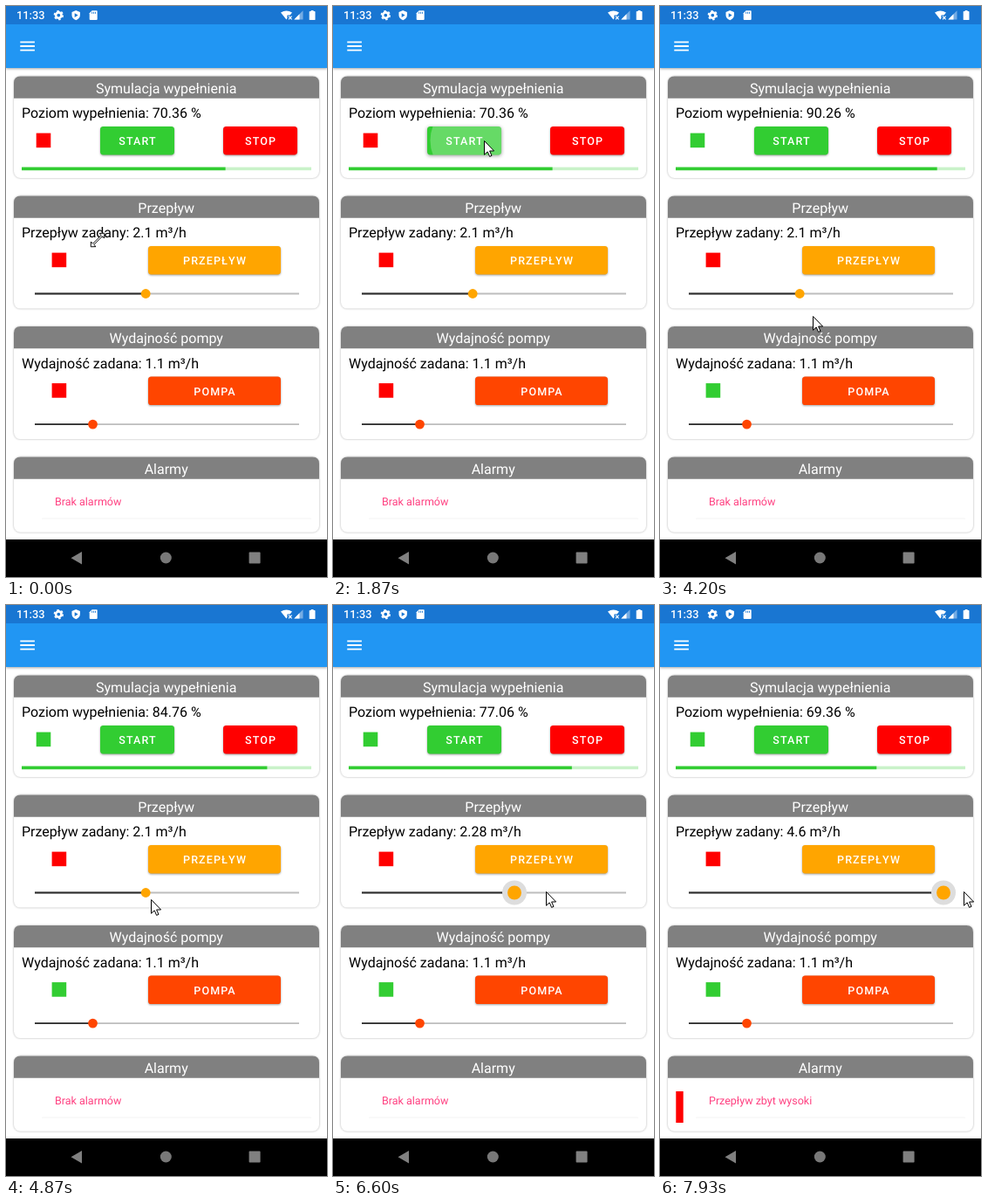
Recreate the animation shown at these times as an HTML page. Size 368 by 654 pixels, loop 8000 ms.

```html
<!DOCTYPE html>
<html lang="pl">
<head>
<meta charset="utf-8">
<title>Symulacja</title>
<style>
  html, body { margin: 0; width: 100%; height: 100%; overflow: hidden; background: #fff; }
  svg { display: block; width: 368px; height: 654px; font: 16px Roboto, sans-serif; text-rendering: geometricPrecision; }
  .card { fill: #fff; filter: drop-shadow(0 .7px .8px rgba(0,0,0,.32)); }
  .title { fill: #fff; text-anchor: middle; }
  .btn { filter: drop-shadow(0 1px 1px rgba(0,0,0,.32)) drop-shadow(0 0 .7px rgba(0,0,0,.15)); }
  .btn.up { filter: drop-shadow(0 1.5px 2.2px rgba(0,0,0,.42)); }
  .label { font-size: 12.5px; font-weight: 500; letter-spacing: 1.12px; fill: #fff; text-anchor: middle; }
  .bar { filter: drop-shadow(0 1px 1.5px rgba(0,0,0,.35)); }
</style>
</head>
<body>
<svg viewBox="0 0 368 654">
  <rect width="368" height="654" fill="#fff"/>
  <rect class="bar" y="21" width="368" height="50" fill="#2196f3"/>
  <rect width="368" height="21" fill="#1976d2"/>
  <g fill="#fff">
    <text x="12" y="15.2" font-size="12.8" font-weight="500">11:33</text>
    <circle cx="60.3" cy="10.6" r="3.2" fill="none" stroke="#fff" stroke-width="2.6"/>
    <circle cx="60.3" cy="10.6" r="4.9" fill="none" stroke="#fff" stroke-width="1.6" stroke-dasharray="2.5 2.63"/>
    <path d="M80.2 5l4.7 2v3.6c0 2.8-2 4.7-4.7 5.6-2.7-.9-4.7-2.8-4.7-5.6V7z"/>
    <path d="M78.7 8.2v4.8l3.9-2.4z" fill="#1976d2"/>
    <path d="M98.6 5.2h5.2q.9 0 .9.9v9q0 .9-.9.9h-7.2q-.9 0-.9-.9V8.2z"/>
    <path d="M98.7 6.8v2M100.6 6.8v2M102.5 6.8v2" stroke="#1976d2" stroke-width=".9"/>
    <path d="M315 7.6Q321.4 3.2 328 7.6l-2.4 2.9h-3.2v3.6l-1 1.4z"/>
    <path d="M324 11.7l3.6 3.6m0-3.6l-3.6 3.6" stroke="#fff" stroke-width="1.2"/>
    <path d="M340.5 5.3v10.2h-10.2z" opacity=".4"/>
    <path d="M336.5 9.3v6.2h-6.2z"/>
    <path d="M349.7 5.9V5h2.8v.9h1.3q.7 0 .7.7v8.8q0 .7-.7.7h-5.4q-.7 0-.7-.7V6.6q0-.7.7-.7z"/>
    <path d="M16.3 41.4h16.6M16.3 46h16.6M16.3 50.6h16.6" stroke="#fff" stroke-width="1.8"/>
  </g>
  <g id="ui"></g>
  <g id="cursor" stroke="#000">
    <path id="arrow" fill="#fff" d="M.5 .5V16.3L4.2 12.9 6.6 18.4 9 17.4 6.6 12H11.6Z"/>
    <path id="resize" fill="#fff" stroke-width=".9" transform="rotate(-45)"
      d="M-11 0L-6.8-4V-.9H6.8V-4L11 0 6.8 4V.9H-6.8V4Z"/>
  </g>
  <rect y="611" width="368" height="43"/>
  <g fill="#808080">
    <path d="M74.5 632.3L87 625v14.6z"/>
    <circle cx="183.3" cy="632" r="6.5" fill="#787878"/>
    <rect x="278.6" y="625.6" width="13" height="13" rx=".8"/>
  </g>
</svg>
<script>
const RED = '#ff0000', GREEN = '#32cd32';
const $ = id => document.getElementById(id);
const set = (id, attrs) => {
  for (const k in attrs) $(id).setAttribute(k, attrs[k]);
};
const show = (id, on) => set(id, { visibility: on ? 'visible' : 'hidden' });

const card = (y, h, title) => `
  <rect class="card" x="9" y="${y}" width="350" height="${h}" rx="7.5"/>
  <path fill="#808080" d="M9 ${y + 25.3}v-17.8q0-7.5 7.5-7.5h335q7.5 0 7.5 7.5v17.8z"/>
  <text class="title" x="183.7" y="${y + 19.4}">${title}</text>`;
const line = (id, y) => `<text id="${id}" x="18" y="${y}"></text>`;
const led = (id, x, y) => `<rect id="${id}" x="${x}" y="${y}" width="16.6" height="16.6"/>`;
const button = (id, x, y, w, color, label) => `
  <rect id="${id}" class="btn" x="${x}" y="${y}" width="${w}" height="32.4" rx="3.6" fill="${color}"/>
  <g id="${id}Ink"></g>
  <text class="label" x="${x + w / 2 + .56}" y="${y + 20.9}">${label}</text>`;
const slider = (id, y, x, color) => `
  <path d="M33 ${y}H336" stroke="#bdbdbd" stroke-width="1.8"/>
  <path id="${id}Track" d="M33 ${y}H${x}" stroke="#2c2c2c" stroke-width="1.8"/>
  <circle id="${id}Halo" cx="${x}" cy="${y}" r="0" fill="#ddd"/>
  <circle id="${id}Thumb" cx="${x}" cy="${y}" r="5.4" fill="${color}"/>`;

$('ui').innerHTML =
  card(80.4, 116.6, 'Symulacja wypełnienia') + line('level', 128.2) + led('simLed', 34.7, 145.6) +
  button('start', 108, 138, 85, GREEN, 'START') + button('stop', 249, 138, 85, RED, 'STOP') +
  `<rect x="18" y="184.6" width="332" height="3.6" fill="#c9f2c9"/>
   <rect id="fill" x="18" y="184.6" height="3.6" fill="${GREEN}"/>` +
  card(217.4, 129.2, 'Przepływ') + line('flow', 265.2) + led('flowLed', 52.6, 282.6) +
  button('flowBtn', 163, 275, 152, '#ffa500', 'PRZEPŁYW') + slider('flow', 329.5, 160.2, '#ffa500') +
  card(366.9, 129.2, 'Wydajność pompy') + line('pump', 414.8) + led('pumpLed', 52.6, 432.1) +
  button('pumpBtn', 163, 424.6, 152, '#ff4500', 'POMPA') + slider('pump', 479.1, 99.5, '#ff4500') +
  card(516.5, 86.2, 'Alarmy') +
  `<path d="M41 587H350" stroke="#f4f4f4"/>
   <rect id="alarmMark" x="18.3" y="557" width="8.4" height="36" fill="${RED}"/>
   <text id="alarm" x="56" y="571.5" font-size="12.5" fill="#ff4081"></text>`;
$('pump').textContent = 'Wydajność zadana: 1.1 m³/h';
$('startInk').innerHTML = `<clipPath id="clip"><rect x="108" y="138" width="85" height="32.4" rx="3.6"/></clipPath>
  <circle cx="157" cy="154" r="45.5" fill="#fff" opacity=".25" clip-path="url(#clip)"/>`;

// All times are ticks of 1/15 s.
const LOOP = 8000, TICK = 1000 / 15;
const PRESS = 28, DRAG = 92, ALERT = 119;
const pointer = [
  [7, 106, 267], [13, 173, 154], [40, 173, 154], [45, 192, 287], [50, 200, 435], [63, 175, 355],
  [77, 163, 330], [85, 167, 328], [90, 168, 328], [99, 244, 328], [119, 348, 328]
];
const thumb = [[91, 160.2], [92, 171.2], [99, 208], [116, 311.8], [119, 325]];
// Simulation steps done so far.
const progress = [[33, 0], [34, 1], [38, 3], [45, 4], [50, 7], [61, 10], [64, 11], [77, 17], [85, 19], [99, 22], [119, 29]];

function along(keys, n) {
  const i = keys.findIndex(k => k[0] > n);
  if (i === 0) return keys[0].slice(1);
  if (i < 0) return keys[keys.length - 1].slice(1);
  const a = keys[i - 1], b = keys[i], f = (n - a[0]) / (b[0] - a[0]);
  return a.slice(1).map((v, j) => v + (b[j + 1] - v) * f);
}

// Inflow adds 2.1 for ten steps, the pump takes 1.1 from the tenth on.
const levelAt = steps => 70.36 + 2.1 * Math.min(steps, 10) - 1.1 * Math.max(steps - 9, 0);

// The reading is sampled from the slider every eight ticks.
function flowAt(n) {
  if (n < DRAG) return 2.1;
  const [x] = along(thumb, n - (n - DRAG) % 8);
  return +((x - 33) / 303 * 5).toFixed(2);
}

function draw(n) {
  const steps = Math.floor(along(progress, n)[0]), level = levelAt(steps);
  $('level').textContent = `Poziom wypełnienia: ${level.toFixed(2)} %`;
  set('fill', { width: 3.32 * level });
  set('simLed', { fill: steps > 0 ? GREEN : RED });
  set('flowLed', { fill: steps > 0 && steps < 10 ? GREEN : RED });
  set('pumpLed', { fill: steps > 8 ? GREEN : RED });

  $('start').classList.toggle('up', n === PRESS);
  show('startInk', n === PRESS);

  const [x] = along(thumb, n), drag = n >= DRAG;
  $('flow').textContent = `Przepływ zadany: ${flowAt(n)} m³/h`;
  set('flowTrack', { d: `M33 329.5H${x}` });
  set('flowThumb', { cx: x, r: drag ? 8 : 5.4 });
  set('flowHalo', { cx: x, r: drag ? 14 : 0 });

  show('alarmMark', n >= ALERT);
  $('alarm').textContent = n >= ALERT ? 'Przepływ zbyt wysoki' : 'Brak alarmów';

  const idle = n < 7;
  const [cx, cy] = idle ? [105, 268] : along(pointer, n).map(Math.round);
  set('cursor', { transform: `translate(${cx} ${cy})` });
  show('resize', idle);
  show('arrow', !idle);
}

const begin = performance.now();
function frame() {
  const t = (performance.now() - begin) % LOOP;
  draw(Math.min(119, Math.floor((t + 4) / TICK)));
  requestAnimationFrame(frame);
}
frame();
</script>
</body>
</html>
```
